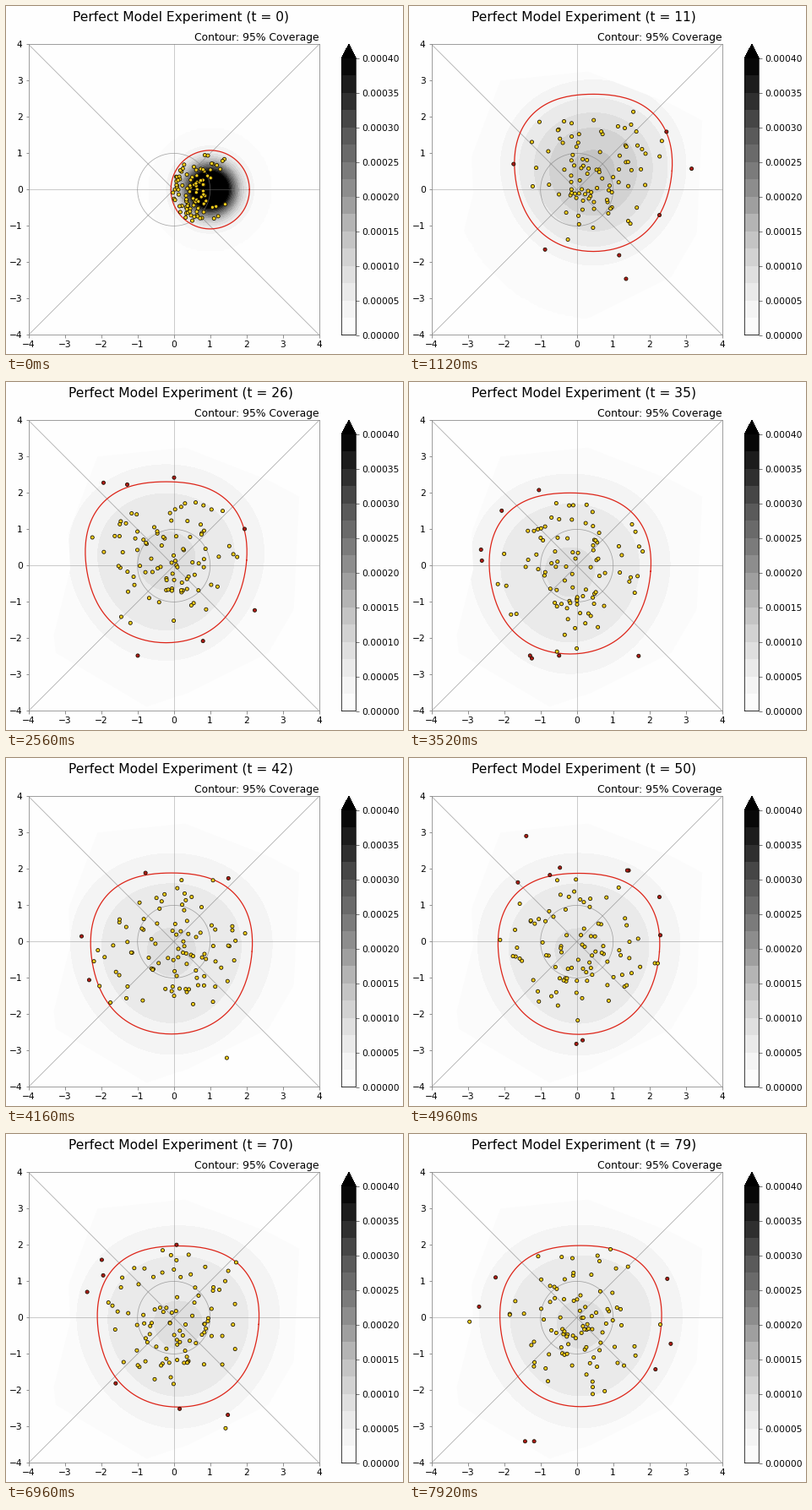
A matplotlib script for the animation above (8000 ms loop, 470 by 412 pixels).

```python
import numpy as np
import matplotlib.pyplot as plt
from matplotlib.animation import FuncAnimation
from matplotlib.path import Path
from matplotlib.patches import Circle

W, H = 470, 412
FRAMES, STEP_MS = 100, 80
DAYS = 80
COUNT = 100
YELLOW, RED, EDGE = "#f6cf1c", "#b01a16", "#161000"
PAPER = "#fefefe"

plt.rcParams.update({"font.family": "DejaVu Sans", "font.size": 10.65})

# Region that the density covers
SUPPORT = Path([(-2.1, 3), (.3, 3.25), (2.6, 2.35), (3.45, 1.9), (3.3, -1.2), (2.6, -2.4),
                (.4, -3.5), (-.75, -3.88), (-3.25, -2.4), (-3.3, -1.9), (-2.85, -.1),
                (-2.9, .9), (-2.1, 3)], closed=True)


def rise(day, scale):
    return 1 - np.exp(-day / scale)


def centre(day):
    """Damped anticlockwise spiral from (1, 0) to the resting mean."""
    rest = .1 - .18j
    return rest + (1 - rest) * np.exp(.082j * day - (day / 32) ** 1.7)


def radius(day, angle):
    size = np.sqrt(1.17 + 3.95 * rise(day, 4))
    bulge = .025 * np.sin(3 * angle) - .02 * np.cos(4 * angle)
    return size * (1 + rise(day, 4) * bulge)


def make_paths():
    """Rotating random walk around the moving centre."""
    rng = np.random.default_rng(12)
    turn = np.pi + 1.05 * rng.standard_normal(COUNT)
    reach = .15 + .88 * np.sqrt(rng.random(COUNT))
    off = reach * np.exp(1j * turn)
    paths = [centre(0) + off]
    for day in range(1, DAYS):
        kick = rng.standard_normal(COUNT) + 1j * rng.standard_normal(COUNT)
        off = off * np.exp(-.1 + .082j) + .43 * kick
        paths.append(centre(day) + off)
    return paths


PATHS = make_paths()
AXIS = np.linspace(-4, 4, 161)
GX, GY = np.meshgrid(AXIS, AXIS)
LEVELS = np.linspace(0, 4e-4, 17)
THETA = np.linspace(0, 2 * np.pi, 181)


def density(day):
    """Sharp bell that widens and flattens."""
    peak = .77 + 6.2 * np.exp(-day / 4.5)
    size = .66 + 2 * rise(day, 9)
    power = 2 + .6 * rise(day, 9)
    off = GX + 1j * GY - centre(day)
    ripple = 1 - .025 * rise(day, 9) * np.sin(3 * np.angle(off))
    z = 1e-4 * peak * np.exp(-(abs(off) * ripple / size) ** power)
    return np.where(z < 1e-6, -1e-6, z)


def box(x0, y0, x1, y1):
    return [x0 / W, 1 - y1 / H, (x1 - x0) / W, (y1 - y0) / H]


fig = plt.figure(figsize=(W / 72, H / 72), dpi=72, facecolor=PAPER)
ax = fig.add_axes(box(26.7, 45.4, 370.7, 389.4), facecolor=PAPER)
cax = fig.add_axes(box(397.3, 45.6, 414.3, 389.6))


def shade(day):
    cs = ax.contourf(GX, GY, density(day), levels=LEVELS, cmap="Greys", extend="max", zorder=1)
    cs.set_clip_path(SUPPORT, ax.transData)
    return cs


fill = shade(0)
bar = fig.colorbar(fill, cax=cax, ticks=LEVELS[::2], format="%.5f")
bar.outline.set_linewidth(.8)
cax.tick_params(width=.8, length=3.5, pad=3, color="#555555")

guide = dict(color="#808080", lw=.8, zorder=2)
for x, y in [(4, 0), (0, 4), (4, 4), (4, -4)]:
    ax.plot([-x, x], [-y, y], alpha=.65 if x and y else .5, **guide)
ax.add_patch(Circle((0, 0), 1, fill=False, alpha=.65, **guide))

ax.set(xlim=(-4, 4), ylim=(-4, 4), xticks=range(-4, 5), yticks=range(-4, 5))
ax.tick_params(width=.8, length=3.5, pad=3.5, color="#777777")
for spine in ax.spines.values():
    spine.set(color="#888888", lw=.8)

title = fig.text(206.8 / W, 1 - 18 / H, "", size=15.5, ha="center")
fig.text(371 / W, 1 - 41.5 / H, "Contour: 95% Coverage", size=12.35, ha="right")
fig.add_artist(plt.Line2D([0, 1], [.5 / H, .5 / H], color="#505050", lw=1))

rim, = ax.plot([], [], color="#dd2418", lw=1.25, zorder=3)
dots = ax.scatter(PATHS[0].real, PATHS[0].imag, s=17, lw=.8, edgecolors=EDGE, zorder=4)


def draw(i):
    global fill
    day = round(i * DAYS / FRAMES)
    fill.remove()
    fill = shade(day)
    mid = centre(day)
    edge = mid + radius(day, THETA) * np.exp(1j * THETA)
    rim.set_data(edge.real, edge.imag)

    z = PATHS[day]
    places = np.column_stack([z.real, z.imag])
    outside = abs(z - mid) > radius(day, np.angle(z - mid))
    dots.set_offsets(places)
    dots.set_facecolor(np.where(outside & SUPPORT.contains_points(places), RED, YELLOW))
    title.set_text(f"Perfect Model Experiment (t = {day})")
    return fill, rim, dots, title


anim = FuncAnimation(fig, draw, frames=FRAMES, interval=STEP_MS, repeat=True, repeat_delay=0, blit=False)
plt.show()
```
